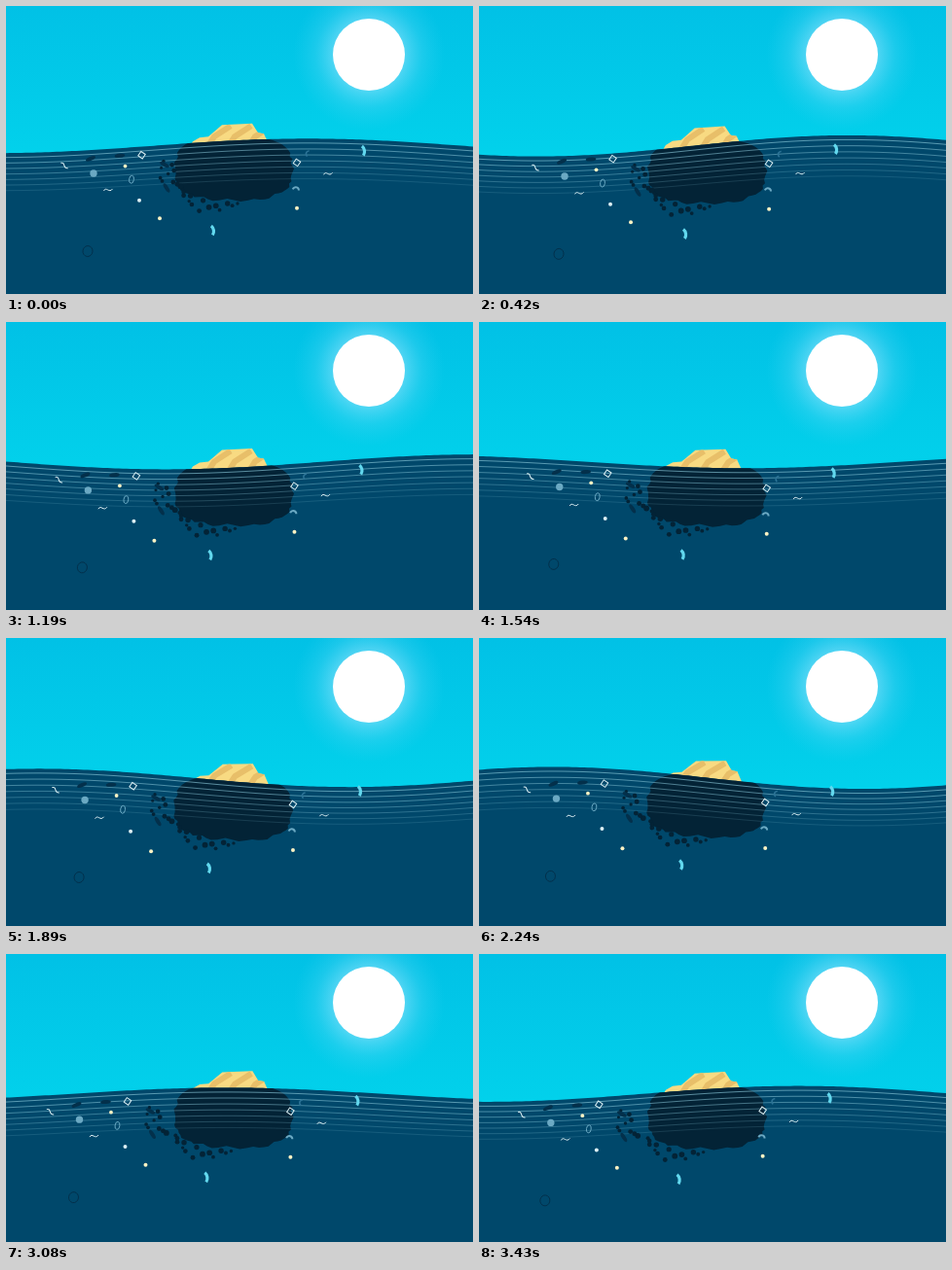
An HTML page with a canvas that plays this animation: 480x296 px, repeating every 3.5 s.

```html
<!DOCTYPE html>
<html lang="en">
<head>
<meta charset="utf-8">
<title>Floating island</title>
<style>
html, body { margin: 0; width: 100%; height: 100%; overflow: hidden; background: #00486b; }
canvas { display: block; width: 480px; height: 296px; }
</style>
</head>
<body>
<canvas id="stage" width="480" height="296"></canvas>
<script>
const c = document.getElementById('stage').getContext('2d');
const { PI, sin, cos, abs, sign } = Math;
const LOOP = 3500, STEP = 70, SWELL = 3350, LEVEL = 143.75;
const SEA = '#00486b', ROCK = '#032336', DARK = '#03304b';
const WHITE = '#dceff3', CREAM = '#fbf3c4', CYAN = '#62d8ee', MIST = '#6ba9c3';
let phase, progress, seed;

function random() {
  seed = seed * 16807 % 2147483647;
  return seed / 2147483647;
}

// The swell travels right and is higher toward the sides.
const theta = x => 2 * PI * (x - 240) / 640;
const wave = x => -6.3 * cos(phase) * cos(theta(x)) - 11.3 * sin(phase) * sin(theta(x));
const bob = x => -5.2 * cos(phase - theta(x));
const drift = x => (x < 180 ? -16.5 : -7.5) * progress;

function fill(color) {
  c.fillStyle = color;
  c.fill();
}

function stroke(color, width) {
  c.strokeStyle = color;
  c.lineWidth = width;
  c.stroke();
}

function oval(rx, ry = rx, turn = 0) {
  c.beginPath();
  c.ellipse(0, 0, rx, ry, turn, 0, 2 * PI);
}

function surface(depth, scale) {
  c.beginPath();
  for (let x = -4; x <= 484; x += 4) c.lineTo(x, LEVEL + depth + wave(x) * scale);
}

// Draws a shape around the origin, placed at a floating point.
function float(x, y, shape) {
  c.save();
  x += drift(x);
  c.translate(x, y + bob(x));
  shape();
  c.restore();
}

const dot = (r, color) => () => { oval(r); fill(color); };
const ring = (rx, ry, color) => () => { oval(rx, ry, .15); stroke(color, 1); };
const dash = turn => () => { oval(5.3, 2, turn); fill(DARK); };
const squiggle = turn => () => {
  c.rotate(turn);
  c.beginPath();
  c.moveTo(-4.5, 1);
  c.bezierCurveTo(-2, -4, 1, 4, 4.5, -1);
  stroke(WHITE, 1);
};
const diamond = () => {
  c.rotate(.6);
  c.strokeStyle = WHITE;
  c.lineWidth = 1;
  c.strokeRect(-2.7, -2.7, 5.4, 5.4);
};
const bow = (r, width, color, turn, sweep) => () => {
  c.rotate(turn);
  c.beginPath();
  c.arc(-r / 2, 0, r, -sweep, sweep);
  stroke(color, width);
};
const chip = bow(7, 3.2, CYAN, -.15, .75);

const bits = [
  [74, 250, ring(5, 5.5, DARK), 10],
  [87, 155, dash(-.4)], [117, 153.5, dash(-.1)], [163, 165, dash(.5)], [165, 189, dash(1)],
  [60, 161, squiggle(.85)], [105, 188, squiggle(0)], [331, 177, squiggle(0)],
  [139.5, 154, diamond], [299, 166, diamond],
  [122.5, 164.5, dot(1.9, CREAM)], [158, 220, dot(2, CREAM)], [299, 213, dot(2, CREAM)],
  [137, 200.5, dot(2, WHITE)], [90, 170.3, dot(3.7, MIST)], [129, 178.5, ring(2.4, 4, MIST)],
  [210, 234.8, chip], [365, 152.7, chip],
  [298, 193, bow(3.2, 2, MIST, -1.4, 1.4)], [310, 156.5, bow(3, 1.6, '#2c7396', -2.8, 1.3)]
];

// Crumbs scattered under the lower left of the rock
function debris() {
  seed = 77;
  for (let i = 0; i < 24; i++) {
    const a = PI * (.5 + .58 * i / 23), far = 1.08 + .36 * random();
    const x = 238 + 60 * far * cos(a), y = 172 + 33 * far * sin(a);
    float(x, y, dot(1.5 + 1.4 * random(), ROCK));
  }
}

function underside() {
  seed = 5;
  c.beginPath();
  for (let i = 0; i < 70; i++) {
    const a = 2 * PI * i / 70, u = cos(a), v = sin(a);
    const rough = v > -.3 ? 3.5 * random() : 1;
    c.lineTo(234 + sign(u) * (62 - rough) * abs(u) ** .7, 167 + sign(v) * (34 - rough) * abs(v) ** .7);
  }
  fill(ROCK);
}

function peak() {
  c.save();
  c.beginPath();
  for (const [x, y] of [[184, 152], [192, 139], [199, 135], [208, 134], [222, 122], [253, 120.5],
    [259, 130], [265, 131], [275, 152]]) c.lineTo(x, y);
  fill('#f8da82');
  c.clip();
  for (let x = 207; x < 270; x += 21) {
    c.beginPath();
    c.moveTo(x, 145);
    c.lineTo(x + 7, 134);
    c.lineTo(x + 24, 123);
    stroke('#e8bf69', 6);
  }
  c.restore();
}

function onIsland(paint) {
  c.save();
  c.translate(235, 145 + bob(235) + 4.8);
  c.rotate(-.03 * (sin(phase) - .4));
  c.translate(-235, -145);
  paint();
  c.restore();
}

const sky = c.createLinearGradient(0, 0, 0, 150);
sky.addColorStop(0, '#01c1e6');
sky.addColorStop(1, '#02d1eb');
const glow = c.createRadialGradient(373, 50, 36, 373, 50, 78);
glow.addColorStop(0, 'rgba(125,222,250,.65)');
glow.addColorStop(.45, 'rgba(95,215,246,.28)');
glow.addColorStop(1, 'rgba(60,208,240,0)');

function draw(t) {
  progress = t / LOOP;
  phase = 2 * PI * (t + 230) / SWELL;

  for (const paint of [sky, glow]) {
    c.fillStyle = paint;
    c.fillRect(0, 0, 480, 296);
  }
  c.beginPath();
  c.arc(373, 50, 37, 0, 2 * PI);
  fill('#fff');

  onIsland(peak);

  c.save();
  surface(0, 1);
  c.lineTo(484, 300);
  c.lineTo(-4, 300);
  fill(SEA);
  c.clip();
  onIsland(underside);
  c.restore();

  for (let i = 0; i < 7; i++) {
    surface(4.5 + 5.9 * i, 1 - .03 * i);
    stroke(`rgba(140,200,218,${.64 - .08 * i})`, 1);
  }

  debris();
  for (const [x, y, shape, shift = 0] of bits) float(x + shift, y, shape);
}

function tick() {
  const t = performance.now() % LOOP;
  draw(Math.floor(t / STEP) * STEP);
  requestAnimationFrame(tick);
}
tick();
</script>
</body>
</html>
```
